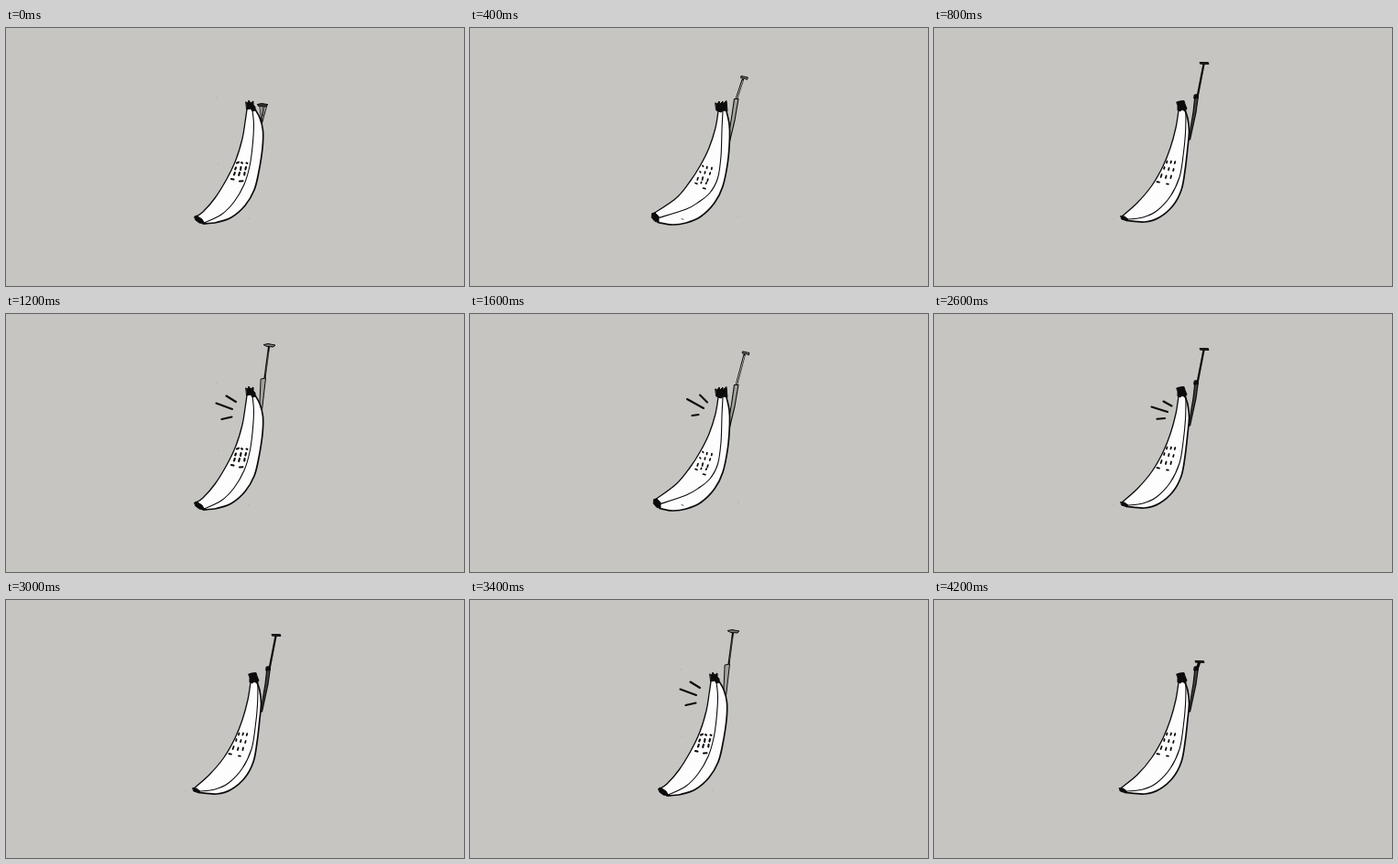
An HTML page that plays this animation: 500 by 282 pixels, repeating every 4.4 s.

```html
<!DOCTYPE html>
<html lang="en">
<head>
<meta charset="utf-8">
<title>Banana phone</title>
<style>
html, body { margin: 0; width: 100%; height: 100%; overflow: hidden; background: #c7c5c1; }
svg { display: block; width: 100vw; height: 100vh; }
</style>
</head>
<body>
<svg id="stage" viewBox="0 0 500 282" fill="none" stroke="#0b0b0b" stroke-linecap="round" stroke-linejoin="round"></svg>
<script>
const INK = '#0b0b0b', PAPER = '#fdfdfd', GREY = '#a3a19e', STEP = 200;
const stage = document.getElementById('stage');

// Smooth curve through points given as "x,y x,y ..."
function curve(text) {
  const p = text.split(' ').map(s => s.split(',').map(Number));
  let d = 'M' + p[0];
  for (let i = 0; i < p.length - 1; i++) {
    const a = p[i - 1] || p[i], b = p[i], c = p[i + 1], e = p[i + 2] || c;
    const near = b.map((v, k) => v + (c[k] - a[k]) / 6);
    const far = c.map((v, k) => v - (e[k] - b[k]) / 6);
    d += `C${near} ${far} ${c}`;
  }
  return d;
}
const path = (d, width = 1, fill = 'none', more = '') =>
  `<path d="${d}" stroke-width="${width}" fill="${fill}" ${more}/>`;

function fruit({ left, right, inner, stem, tip, keys, keyWidth }) {
  const body = curve(left) + curve(right).replace('M', 'L') + 'Z';
  return path(body, 0, PAPER, 'stroke="none"') + path(curve(left), 1.3) +
    path(curve(right), 1.7) + path(curve(inner), 1.1) +
    path(stem, 1, INK) + path(tip, 1, INK) + path(keys, keyWidth);
}

const upright = {
  left: '263,89 261,103 258,121 251,144 241,165 228,186 215,201 206,207',
  right: '215,214 230,212.5 246,207 261,194 271,177 276,157 280,131 280.5,112 277,98 272,89',
  inner: '269,90 270.5,106 269,130 266,151 260,171 249,190 235,204 216,213',
  stem: 'M262 81L264 82L265 79L267 82L270 80L270 84L272 86L272 90L269 91L267 88L263 89Z',
  tip: 'M206 206L208 205L214 209L217 214L211 213L207 210Z',
  keys: 'M252 147.5l2 -.8M257 147l1 .6M262.5 147.5l1 .4M251 152.5l-.8 2M256.5 152l-.5 3M262 152l-.6 2.6M249.8 158l-.8 2.5M255 158l-.8 3M260.6 158l-.4 2.5M246 165l2.5 .6M255 167.5l3.5 -.3',
  keyWidth: 2.1
};
const leaning = dx => ({
  left: `267,90 264,109 258,131 250,151 238,172 222,191 ${205 + dx},206`,
  right: `${211 + dx},210.5 230,212 246,207 261,194 270,177 274,156 277,130 278.5,113 277,99 274,90`,
  inner: `275,91 274.5,115 272,140 268,163 258,184 243,200 228,207 ${212 + dx},209`,
  stem: 'M265 81L268 80L273 79.5L274 83L276 88L274 91L271 89L269 91L266 90L266 85Z',
  tip: `M${204 + dx} 205.5l4 .5l4 3l-1 2l-6 -2Z`,
  keys: 'M254.5 145.5l-.6 2M259 145.5l-.6 2M263.3 146l-.6 2M251.6 152l-.5 2M256.6 153l-.6 2.2M261.7 154l-.6 2M248.6 160l-1 3M253.6 161.5l-.7 2.5M259 161.5l-.6 2.5M243.5 168l2.5 .6M254 170.3l1.8 .4',
  keyWidth: 1.8
});
const tilted = dx => ({
  left: `271,91 268,109 261,131 251,151 240,168 225,186 ${202 + dx},203`,
  right: `${207 + dx},212.5 221,215 236,213 252,206 267,191 276,173 281.5,146 283.5,120 283,105 280,91`,
  inner: `276,91 275,111 274,140 270.5,164 262,180 250,190 236,198 ${208 + dx},207.5`,
  stem: 'M268 82L270 83L272 80L273 83L276 80L276 83L280 79.5L281 91L277 90L274 92L271 91L269 90Z',
  tip: `M${201 + dx} 202.5l3 -.5l4 4l0 6l-4 -.5l-3.5 -4Z`,
  keys: 'M254 150.5l.6 .8M258.8 151.5l-.3 2M264 152.5l-.3 2M251 157l.7 .8M256.7 157l-.4 2M262.3 158l-.6 2M249 163.5l-.8 2.4M254.2 163l-.6 3M259.8 165l-.6 2.3M246 169.5l2 .8M252.6 168.4l-.4 1.2M258.2 169l-.6 1.2M254.5 175l2.4 .6',
  keyWidth: 1.7
});

// Each aerial is drawn behind the fruit; the head slides along the rod
function aerialUp(out) {
  if (!out) return path('M277 86L279 104M280 86L279.5 104M284.5 86L279 106M282 86L280.5 96', .9) +
    path('M274.5 83.5L279 82.5L285.5 83.5L284 86L276 85.5Z', 1.2, '#333');
  return path('M287 36L282.5 70', 2) + path('M286.5 42L283.5 66', .5, 'none', 'stroke="#777"') +
    path('M278.5 71L283.5 70L279.5 105L277 100Z', 1, GREY) +
    path('M281.5 33.5L286 32.5L294 34L292 36L285 35.5Z', 1, '#777');
}
function aerialLean(out) {
  const x = out ? 295 : 290, y = out ? 38.5 : 67.5;
  return path(`M${x - .5} ${y + 1}L288 73`, out ? 2.2 : 3.2) +
    path('M285 74L288.5 74L286 92L279.5 122L278 122L283 92Z', 1.2, '#444') +
    path('M284.5 73l4 -.5l0 4l-4.5 .5Z', 1, INK) +
    path(`M${x - 4.5} ${y - 1}l9 .2l.4 1.8l-9 -.3Z`, 1, '#222');
}
function aerialTilt(out) {
  const x = out ? 300.5 : 298.8, y = out ? 43 : 54.5;
  return path(`M${x - 1} ${y + 2}L291 77`, 2.4) +
    path(`M${x - 1} ${y + 3}L291 77`, .9, 'none', 'stroke="#bbb"') +
    path('M288.5 77.5L293 77.5L289 101L283 126L281 126L286 95Z', 1.1, GREY) +
    path(`M${x - 2.5} ${y - 2}l7 1.5l-.8 2.5l-1.6 -1l-5 -1Z`, 1, '#777');
}

const speck = (x, y) => `<circle cx="${x}" cy="${y}" r=".5" fill="#999" stroke="none"/>`;
const upSpecks = speck(230, 76) + speck(232, 149) + speck(265, 208);
const tiltSpecks = speck(293, 206) + path('M231 208.5l2 .8', .7);
const poses = {
  a: aerialUp(false) + fruit(upright) + upSpecks,
  A: aerialUp(true) + fruit(upright) + upSpecks,
  b: aerialLean(false) + fruit(leaning(-1.5)) + speck(195, 208),
  B: aerialLean(true) + fruit(leaning(0)) + speck(196, 209),
  c: aerialTilt(false) + fruit(tilted(-2)) + tiltSpecks,
  C: aerialTilt(true) + fruit(tilted(0)) + tiltSpecks
};
const rings = {
  A: 'M240.5 89.5L251 96M229.5 97.5L247 104M235.5 115L246.5 112.5',
  B: 'M250.5 95.5L259.5 100.5M237.5 101.5L255 107M243.5 114.8L252 114',
  C: 'M251 88.5L259 96.5M237 93L255 103M242.5 111L249.5 110'
};

// Small letters: aerial not fully out; + marks a ringing pose
const beats = 'a b c A B C A+ B+ C+ A B C A+ B+ A+ B C A+ B+ C+ c b'.split(' ');
const views = {};
for (const beat of new Set(beats)) {
  const g = document.createElementNS('http://www.w3.org/2000/svg', 'g');
  g.innerHTML = poses[beat[0]] + (beat[1] ? path(rings[beat[0]], 2.1) : '');
  g.style.display = 'none';
  stage.append(g);
  views[beat] = g;
}

let shown;
function draw(now) {
  const next = views[beats[Math.floor(now / STEP) % beats.length]];
  if (next !== shown) {
    if (shown) shown.style.display = 'none';
    next.style.display = '';
    shown = next;
  }
}
const start = performance.now();
function tick() {
  draw(performance.now() - start);
  requestAnimationFrame(tick);
}
tick();
</script>
</body>
</html>
```
